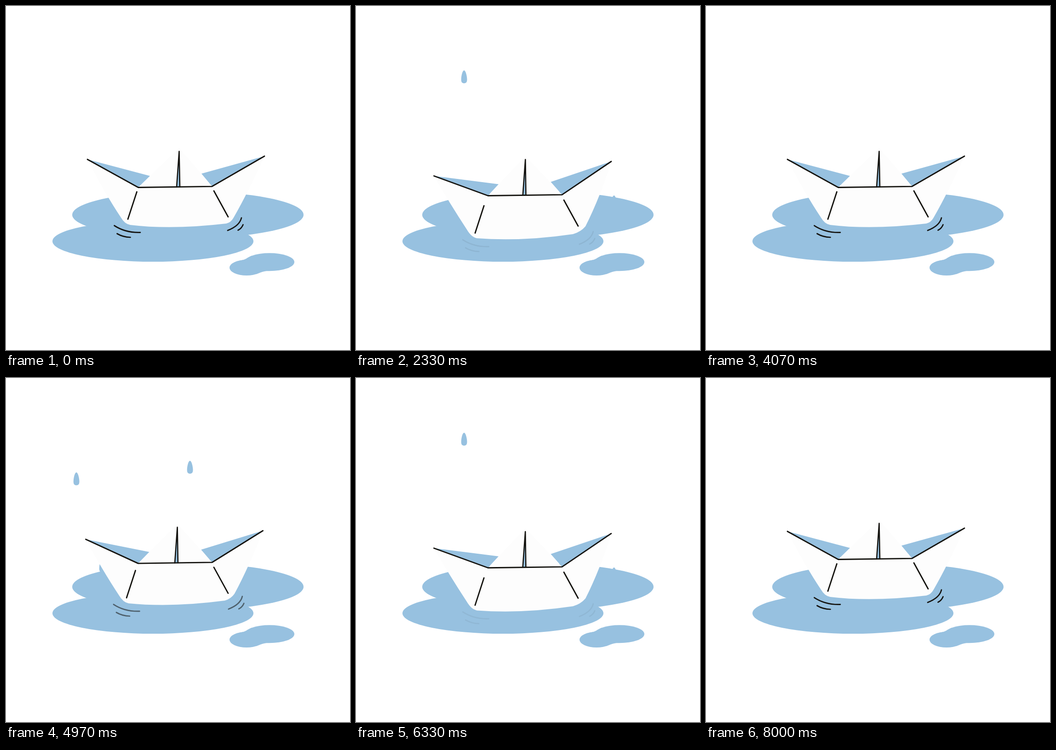
An HTML page with a canvas for the animation above (8.03 s loop, 748 by 748 pixels).

```html
<!DOCTYPE html>
<html lang="en">
<head>
<meta charset="utf-8">
<title>Paper boat</title>
<style>
html, body { margin: 0; width: 100%; height: 100%; overflow: hidden; background: #fff; }
canvas { display: block; width: 748px; height: 748px; }
</style>
</head>
<body>
<canvas id="stage" width="748" height="748"></canvas>
<script>
const ctx = document.getElementById('stage').getContext('2d');
const BLUE = '#97c1e0', PAPER = '#fdfdfd', INK = '#14130f';
const LOOP = 8030, STEPS = 241, HALF = 121, CYCLE = 120;
const FALL = 21, TOP = 75, REST = 7;

// x, first step, resting top
const drops = [
  [607, 2.5, 543],
  [209, 12.8, 395],
  [153, 21.8, 460],
  [400, 23, 420],
  [561, 48.67, 412],
  [235, 66.9, 430],
  [480, 86, 425],
  [340, 104.2, 400]
];

// Boat points: x, y at the crest, then the shift towards the trough
const boat = {
  tipL: [177, 333.5, -7.5, 36],
  tipR: [562, 326.5, -7, 11.5],
  foldL: [287.5, 394.5, -0.5, 18],
  foldR: [448, 392.3, 0, 18],
  sail: [376.5, 309, -8.2, 18],
  backL: [313, 369.5, -3, 18],
  backR: [425, 364.5, -1.5, 18],
  mast: [376.5, 316, -8.2, 17.7],
  mastL: [371, 393.5, -8.3, 18],
  mastR: [378, 393.3, -8.5, 18],
  creaseL1: [284.5, 404, -6.2, 30.3],
  creaseL2: [265, 463.5, -6, 30.2],
  creaseR1: [452, 402, 0, 20],
  creaseR2: [483, 458.5, 0, 20],
  sideR: [526, 406, 5, 9.5],
  chineR: [495, 460, 4, 19],
  bilgeR: [489, 471, 0, 20],
  keelR: [479, 473, -7, 23],
  keel: [360, 487, 0, 25.5],
  keelL: [270, 476, -7, 29],
  bilgeL: [258, 474, -7, 29],
  chineL: [250, 460, -9, 26],
  sideL: [217, 411, -14, 17]
};

function ellipse(x, y, rx, ry) {
  ctx.beginPath();
  ctx.ellipse(x, y, rx, ry, 0, 0, Math.PI * 2);
  ctx.fill();
}

function polygon(color, ...pts) {
  ctx.fillStyle = color;
  ctx.beginPath();
  pts.forEach(p => ctx.lineTo(...p));
  ctx.closePath();
  ctx.fill();
}

function line(...pts) {
  ctx.beginPath();
  pts.forEach(p => ctx.lineTo(...p));
  ctx.stroke();
}

function arc(x1, y1, cx, cy, x2, y2) {
  ctx.beginPath();
  ctx.moveTo(x1, y1);
  ctx.quadraticCurveTo(cx, cy, x2, y2);
  ctx.stroke();
}

function drawPuddles() {
  ctx.fillStyle = BLUE;
  ellipse(395.5, 454, 251.5, 51);
  ellipse(319.5, 511.5, 218.5, 44.5);
  ellipse(573, 556.8, 54, 19.5);
  ellipse(523, 569, 37, 17);
  ctx.beginPath();
  ctx.moveTo(508, 553.5);
  ctx.bezierCurveTo(521, 552, 524, 548, 534, 543);
  ctx.lineTo(575, 576);
  ctx.bezierCurveTo(559, 576, 556, 579, 544, 583);
  ctx.fill();
}

function drawDrop(x, y) {
  ctx.save();
  ctx.translate(x, y);
  ctx.beginPath();
  ctx.moveTo(0, 0);
  ctx.bezierCurveTo(3.5, 0, 6.5, 13, 6.5, 20);
  ctx.bezierCurveTo(6.5, 26, 4, 28, 0, 28);
  ctx.bezierCurveTo(-4, 28, -6.3, 26, -6.3, 20);
  ctx.bezierCurveTo(-6.3, 12, -3.5, 0, 0, 0);
  ctx.fill();
  ctx.restore();
}

function drawRain(step) {
  ctx.fillStyle = BLUE;
  for (const [x, start, end] of drops) {
    const age = step - start;
    const landed = (end - TOP) / FALL;
    if (age >= 0 && age < landed + REST) drawDrop(x, Math.min(end, TOP + age * FALL));
  }
}

function drawBoat(sink) {
  const k = sink / 0.933, b = {};
  for (const name in boat) {
    const [x, y, dx, dy] = boat[name];
    b[name] = [x + dx * k, y + dy * k];
  }
  const curve = (c, p) => ctx.quadraticCurveTo(...b[c], ...b[p]);

  polygon(BLUE, b.tipL, b.backL, b.foldL);
  polygon(BLUE, b.tipR, b.backR, b.foldR);
  polygon(PAPER, b.foldL, b.sail, b.foldR);

  ctx.beginPath();
  ctx.moveTo(...b.tipL);
  ctx.lineTo(...b.foldL);
  ctx.lineTo(...b.foldR);
  ctx.lineTo(...b.tipR);
  curve('sideR', 'chineR');
  curve('bilgeR', 'keelR');
  curve('keel', 'keelL');
  curve('bilgeL', 'chineL');
  curve('sideL', 'tipL');
  ctx.fill();

  polygon(BLUE, b.mast, b.mastL, b.mastR);
  ctx.lineWidth = 2.6;
  line(b.mastL, b.mast, b.mastR);
  ctx.lineWidth = 2.8;
  line(b.tipL, b.foldL, b.foldR, b.tipR);
  line(b.creaseL1, b.creaseL2);
  line(b.creaseR1, b.creaseR2);
}

function drawRipples(sink) {
  ctx.save();
  ctx.globalAlpha = 1 - sink;
  ctx.lineWidth = 2.7;
  ctx.translate(-3.5 * sink, 33 * sink);
  arc(235.5, 477.5, 260, 493.5, 292, 492.3);
  arc(241.5, 495, 254, 502.5, 270.5, 503);
  ctx.translate(7.5 * sink, -0.8 * sink);
  arc(482, 488, 508, 478, 512, 460.5);
  arc(504.5, 487.5, 512, 484, 515.5, 475.5);
  ctx.restore();
}

// The first pass skips every third step, the second shows them all
function stepAt(ms) {
  const n = Math.floor((ms % LOOP + 6) * STEPS / LOOP) % STEPS;
  if (n >= HALF) return n - HALF;
  return n % 3 === 2 ? n - 1 : n;
}

function draw(ms) {
  const step = stepAt(ms);
  const sink = (1 - Math.cos(step / CYCLE * Math.PI * 2)) / 2;
  ctx.fillStyle = '#fff';
  ctx.fillRect(0, 0, 748, 748);
  ctx.strokeStyle = INK;
  ctx.lineCap = ctx.lineJoin = 'round';
  drawPuddles();
  drawRain(step);
  drawBoat(sink);
  drawRipples(sink);
}

const began = performance.now();
function tick() {
  draw(performance.now() - began);
  requestAnimationFrame(tick);
}
tick();
</script>
</body>
</html>
```
